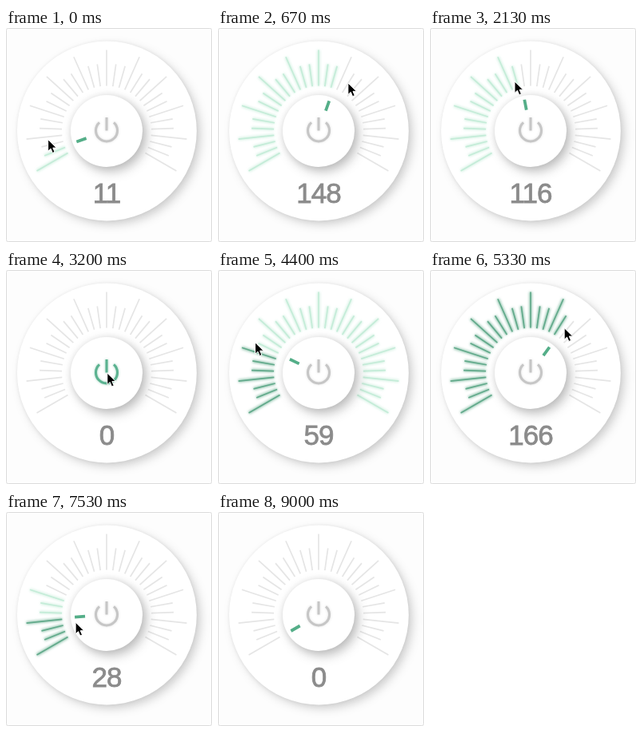
An HTML page for the animation above (9.74 s loop, 258 by 268 pixels).

```html
<!DOCTYPE html>
<html lang="en">
<head>
<meta charset="utf-8">
<title>Dial control</title>
<style>
  html, body { margin: 0; width: 100%; height: 100%; overflow: hidden; background: #fdfdfd; }
  svg { display: block; width: 100vw; height: 100vh; }
  .dial { filter: drop-shadow(5px 5px 6px rgba(0, 0, 0, .17)) drop-shadow(0 0 2px rgba(0, 0, 0, .07)); }
  .knob { filter: drop-shadow(5px 6px 7px rgba(0, 0, 0, .23)) drop-shadow(0 0 4px rgba(0, 0, 0, .1)); }
  text {
    font: 35px "Liberation Sans", Arial, sans-serif; letter-spacing: -1px; text-anchor: middle;
    fill: #8b8b8b; stroke: #8b8b8b; stroke-width: .8px;
  }
</style>
</head>
<body>
<svg viewBox="0 0 258 268">
  <defs>
    <filter id="blur" filterUnits="userSpaceOnUse" x="0" y="0" width="258" height="268">
      <feGaussianBlur stdDeviation="1.6"/>
    </filter>
    <path id="icon" d="M117 118.4A13.5 13.5 0 1 0 135 118.4M126 112V128.5"/>
  </defs>
  <rect x=".5" y=".5" width="257" height="267" rx="2" fill="#fdfdfd" stroke="#dcdcdc"/>
  <circle class="dial" cx="126.4" cy="129" r="112.4" fill="#fff"/>
  <g id="glows" filter="url(#blur)" stroke-width="4"></g>
  <g id="ticks" stroke-width="1.7"></g>
  <circle class="knob" cx="126" cy="129" r="45" fill="#fff"/>
  <line id="pointer" x1="99" y1="129" x2="86" y2="129" stroke="#54ae88" stroke-width="3.8"/>
  <g id="power" fill="none" stroke-width="3">
    <use href="#icon" filter="url(#blur)" opacity=".6"/>
    <use href="#icon"/>
  </g>
  <text id="number" x="126" y="219.3"></text>
  <path id="cursor" d="M0 0V14.5L3.4 11.4L5.7 16.8L8.4 15.6L6.1 10.4H10.6Z" fill="#000" stroke="#fff"/>
</svg>
<script>
const LOOP = 9740, STEP = 200 / 3;
const CX = 126, CY = 128.5;
const TICKS = 31, MAX = 255, START = -30, SWEEP = 240;
const LEAD = 60;          // the dial trails the cursor by this many ms
const CURSOR_GONE = 8790;
const GREY = [229, 229, 229], LIGHT = [196, 236, 216], DARK = [98, 170, 139];
const ICON_OFF = [198, 198, 198], ICON_ON = [91, 178, 144];

// Cursor gestures: value and radius (0 = on the knob) reached, optional click that commits the value.
const moves = [
  { from: -53, to: -53, value: 0, r: 75 },
  { from: -53, to: 1070, value: 231, r: 65 },
  { from: 1244, to: 2470, value: 72, r: 66 },
  { from: 2800, to: 3130, value: 0, r: 0 },
  { from: 3480, to: 3600, value: 255, r: 0, click: 3500 },
  { from: 3870, to: 4400, value: 59, r: 89, click: 4590 },
  { from: 4770, to: 5130, value: 166, r: 70, click: 5325 },
  { from: 5570, to: 5800, value: 242, r: 72, click: 5990 },
  { from: 6230, to: 6717, value: 55, r: 74, click: 6990 },
  { from: 7370, to: 7703, value: 0, r: 0, click: 8120 },
  { from: 8660, to: 8800, value: 0, r: 60, aim: 266 }
];

const $ = id => document.getElementById(id);
const clamp = x => Math.min(1, Math.max(0, x));
const lerp = (a, b, k) => a + (b - a) * k;
const mix = (a, b, k) => `rgb(${a.map((c, i) => Math.round(lerp(c, b[i], k)))})`;
const angle = value => START + value / MAX * SWEEP;

// Angles are measured clockwise from the left horizon.
function polar(deg, r) {
  const a = deg * Math.PI / 180;
  return [CX - r * Math.cos(a), CY - r * Math.sin(a)];
}

function gesture(t) {
  const n = Math.max(1, moves.findLastIndex(m => m.from <= t));
  const prev = moves[n - 1], move = moves[n];
  const k = clamp((t - move.from) / (move.to - move.from));
  const value = lerp(prev.value, move.value, k);
  return {
    value,
    r: lerp(prev.r, move.r, k * k),
    aim: prev.r ? value : move.aim ?? move.value
  };
}

function addLine(parent, i) {
  const line = document.createElementNS("http://www.w3.org/2000/svg", "line");
  const deg = START + i * SWEEP / (TICKS - 1);
  const [x1, y1] = polar(deg, 56);
  const [x2, y2] = polar(deg, i % 3 ? 84 : 101);
  for (const [name, value] of Object.entries({ x1, y1, x2, y2 })) line.setAttribute(name, value);
  return parent.appendChild(line);
}

const ticks = Array.from({ length: TICKS }, (_, i) => ({
  line: addLine($("ticks"), i),
  glow: addLine($("glows"), i)
}));

const lit = (value, i) => value > 0 && value >= i * MAX / (TICKS - 1);

function render(t) {
  const { value } = gesture(t);
  const committed = moves.findLast(m => m.click <= t)?.value ?? 0;

  // Dark where preview and committed value agree, light where only one reaches.
  ticks.forEach(({ line, glow }, i) => {
    const level = lit(value, i) + lit(committed, i);
    const color = `rgb(${[GREY, LIGHT, DARK][level]})`;
    line.setAttribute("stroke", color);
    glow.setAttribute("stroke", color);
    glow.setAttribute("opacity", level ? .6 : 0);
  });

  const { aim, r } = gesture(t + LEAD);
  const hover = clamp((36 - r) / 20);
  $("pointer").setAttribute("transform", `rotate(${angle(value)} 126 129)`);
  $("pointer").setAttribute("opacity", 1 - hover);
  $("power").setAttribute("stroke", mix(ICON_OFF, ICON_ON, hover));
  $("number").textContent = Math.round(value);

  const [x, y] = polar(angle(aim), r);
  $("cursor").setAttribute("transform", `translate(${x + .8} ${y + .6})`);
  $("cursor").setAttribute("visibility", t < CURSOR_GONE ? "visible" : "hidden");
}

const start = performance.now();
function frame() {
  const t = (performance.now() - start) % LOOP;
  render(Math.floor((t + 4) / STEP) * STEP);
  requestAnimationFrame(frame);
}
frame();
</script>
</body>
</html>
```
